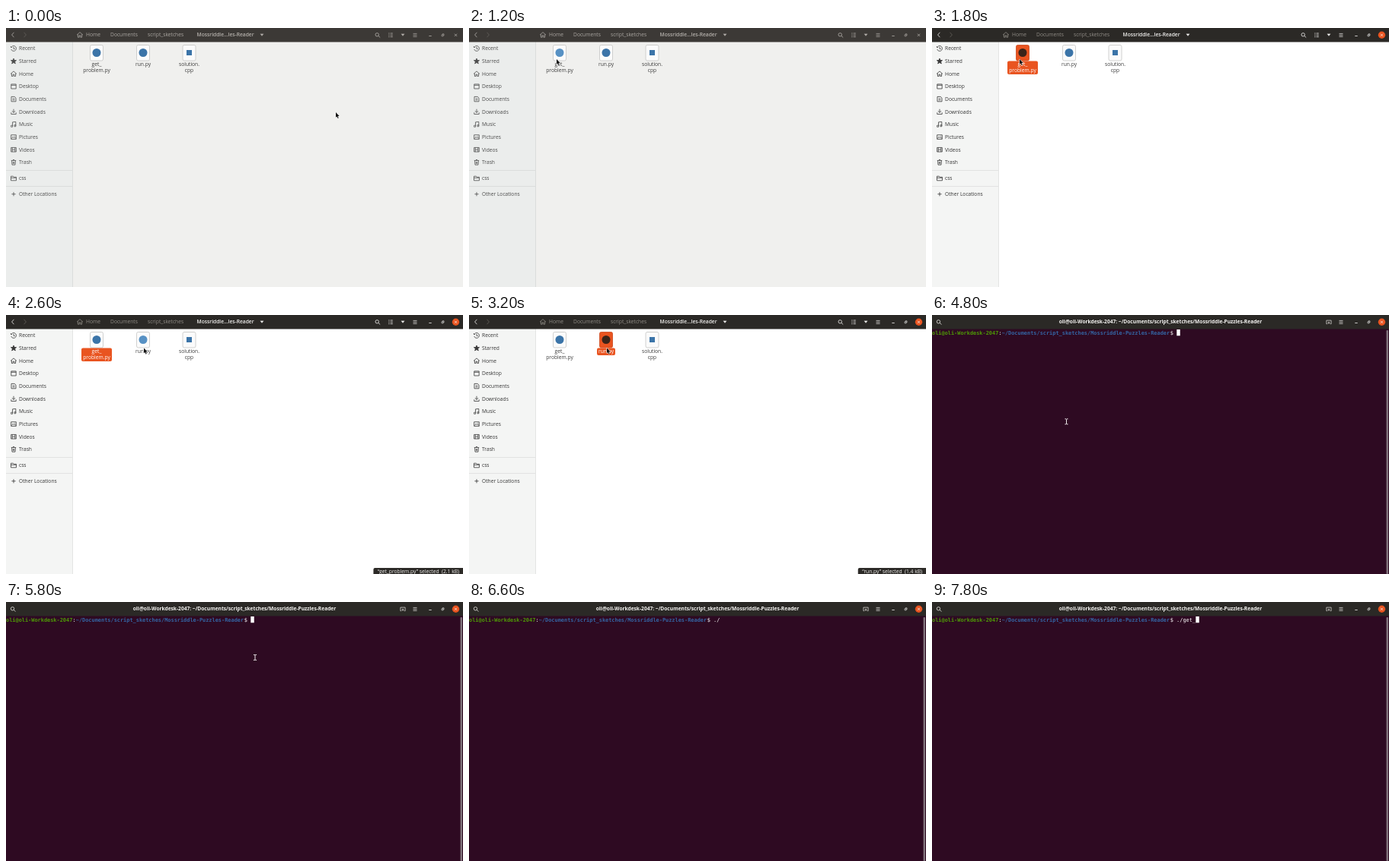
These frames come from a looping animation (600 px wide and 341 px high, 8000 ms). An HTML page with a canvas:

```html
<!DOCTYPE html>
<html lang="en">
<head>
<meta charset="utf-8">
<style>
html, body { margin: 0; width: 100%; height: 100%; overflow: hidden; }
canvas { display: block; }
</style>
</head>
<body>
<canvas id="stage" width="600" height="341"></canvas>
<script>
const ctx = document.getElementById('stage').getContext('2d');
const UI = '"Open Sans", "Noto Sans", sans-serif';
const MONO = '6.92px "DejaVu Sans Mono", monospace';
const CELL = 4.17, ORANGE = '#e95420';
const HOST = 'oli@oli-Workdesk-2047';
const FOLDER = '~/Documents/script_sketches/Mossriddle-Puzzles-Reader';

// Symbolic icons, drawn around their own centre
const ICONS = {
  clock: 'M-2.6-2.2A3.4 3.4 0 1 1-3.2 1M-3.6-3V-1.5H-2M0-2V.4H1.8',
  star: 'M0-3.6L1-1.1 3.6-1 1.6.7 2.3 3.3 0 1.8-2.3 3.3-1.6.7-3.6-1-1-1.1Z',
  home: 'M-4 .2L0-3.4 4 .2M-2.6-.6V3.2H-.8V.8H.8V3.2H2.6V-.6',
  desktop: 'M-3.2-3H3.2V3H-3.2ZM-3.2-1.6H3.2',
  document: 'M-3-3.2H1.2L3-1.4V3.2H-3ZM-1.4-.6H1.4M-1.4 1.2H1.4',
  download: 'M0-3.5V1M-2-1L0 1.2 2-1M-3.2 1V3.2H3.2V1',
  music: 'M-1.4 2.4V-3L2.8-3.4V1.8M-1.5 2.4A1 .8 0 1 1-3.3 2.4 1 .8 0 1 1-1.5 2.4M2.8 1.8A1 .8 0 1 1 1 1.8 1 .8 0 1 1 2.8 1.8',
  picture: 'M-3.3-2.8H3.3V2.8H-3.3ZM-2.6 2L-.8-.4.6 1 1.6 0 2.8 2M1-1.2H1.6',
  video: 'M-3.3-2.8H3.3V2.8H-3.3ZM-1.8-2.8V2.8M1.8-2.8V2.8M-1.8 0H1.8',
  trash: 'M-3.2-2.4H3.2M-1-3.3H1M-2.4-2.2L-2 3.3H2L2.4-2.2M-.7-.8V2M.7-.8V2',
  folder: 'M-3.5-2.8H-.6L.2-1.7H3.5V2.8H-3.5ZM-3.5-.7H3.5',
  plus: 'M-2.6 0H2.6M0-2.6V2.6',
  back: 'M1.4-3.2L-1.4 0 1.4 3.2',
  forward: 'M-1.4-3.2L1.4 0-1.4 3.2',
  search: 'M1.4-.5A2.2 2.2 0 1 1-3-.5 2.2 2.2 0 1 1 1.4-.5M.9 1.1L3.2 3.2',
  list: 'M-2.8-2.3H-1.5M-.4-2.3H2.8M-2.8 0H-1.5M-.4 0H2.8M-2.8 2.3H-1.5M-.4 2.3H2.8',
  menu: 'M-2.5-2H2.5M-2.5 0H2.5M-2.5 2H2.5',
  tab: 'M-1.8 2.4H-3.1V-2.2H3.1V2.4H1.8M0-.7V2.5M-1.5.9H1.5',
  minimise: 'M-1.7 1.3H1.7',
  restore: 'M-1.5-.6H.6V1.4H-1.5ZM-.5-.8V-1.6H1.5V.4H.8',
  close: 'M-1.6-1.6L1.6 1.6M1.6-1.6L-1.6 1.6'
};
const PLACES = [['clock', 'Recent'], ['star', 'Starred'], ['home', 'Home'],
  ['desktop', 'Desktop'], ['document', 'Documents'], ['download', 'Downloads'],
  ['music', 'Music'], ['picture', 'Pictures'], ['video', 'Videos'], ['trash', 'Trash']];

function box(x, y, w, h, color, radius = 0, border) {
  ctx.beginPath();
  ctx.roundRect(x, y, w, h, radius);
  ctx.fillStyle = color;
  ctx.fill();
  if (border) {
    ctx.strokeStyle = border;
    ctx.lineWidth = 0.8;
    ctx.stroke();
  }
}

function disc(x, y, r, color) {
  ctx.beginPath();
  ctx.arc(x, y, r, 0, 7);
  ctx.fillStyle = color;
  ctx.fill();
}

function text(str, x, y, color, { font = '6.7px ' + UI, align = 'left' } = {}) {
  ctx.font = font;
  ctx.textAlign = align;
  ctx.fillStyle = color;
  ctx.fillText(str, x, y + 2.4);
}

function shape(path, x, y, color, { width = 0.8, fill } = {}) {
  ctx.save();
  ctx.translate(x, y);
  const p = new Path2D(path);
  ctx.lineWidth = width;
  ctx.strokeStyle = color;
  ctx.stroke(p);
  if (fill) {
    ctx.fillStyle = fill;
    ctx.fill(p);
  }
  ctx.restore();
}

const icon = (name, x, y, color, width) =>
  shape(ICONS[name], x, y, color, { width, fill: name === 'star' && color });

const arrow = (x, y) => shape('M0 0V6.8L1.5 5.4 2.6 7.9 3.7 7.4 2.6 5H4.7Z', x, y,
  '#ffffff', { width: 1, fill: '#111111' });

const ibeam = (x, y, color) =>
  shape('M-2-3.5H-.5L0-3 .5-3.5H2M0-3V3M-2 3.5H-.5L0 3 .5 3.5H2', x, y, color, { width: 1 });

function windowButtons(color, focused) {
  icon('menu', 537, 9.4, color, 0.7);
  icon('minimise', 557, 9.2, color);
  icon('restore', 573.5, 9.4, color, 0.6);
  if (focused) disc(590.5, 9.3, 4.7, ORANGE);
  icon('close', 590.5, 9.3, color);
}

function file(x, lines, half, { selected, hovered, square }) {
  const tinted = selected && hovered;
  box(x - 8.5, 22.5, 17, 20.5, tinted ? ORANGE : '#fbfbfb', 2, tinted ? '#c9481c' : '#c6c6c4');
  const color = tinted ? '#3a2419' : hovered ? '#5791c4' : '#3b74a8';
  if (square) box(x - 3.5, 29, 7, 7, color);
  else disc(x, 32.5, 5.5, color);
  if (selected) box(x - half, 43.4, half * 2, lines.length * 8 + 1.6, ORANGE, 2);
  lines.forEach((line, i) =>
    text(line, x, 48 + i * 8, selected ? '#ffffff' : '#3d3d3d', { align: 'center' }));
}

function fileManager(t) {
  const focused = t >= 1800;
  const bright = focused ? '#f4f3f1' : '#b5b1ac';
  const dim = focused ? '#918d87' : '#aaa6a1';
  const ink = focused ? '#363636' : '#4c4c4c';
  const rule = focused ? '#dcdddc' : '#d6d8d7';

  box(0, 0, 600, 341, focused ? '#ffffff' : '#f0f0ee');
  box(0, 18, 87, 323, focused ? '#f4f5f4' : '#ebedec');
  box(87, 18, 0.8, 323, rule);
  box(0, 187, 87, 0.8, rule);
  box(0, 208, 87, 0.8, rule);
  box(0, 0, 600, 18.5, focused ? '#2b2926' : '#3c3936');

  icon('back', 9, 9, bright);
  icon('forward', 25, 9, '#65615c');
  icon('home', 97, 9, dim);
  text('Home', 105, 9, dim);
  text('Documents', 137, 9, dim);
  text('script_sketches', 186, 9, dim);
  text('Mossriddle…les-Reader', 250.5, 9, bright, { font: '600 6.7px ' + UI });
  for (const x of [336, 521])
    shape('M-2.2-1.2H2.2L0 1.6Z', x, 9, bright, { width: 0.2, fill: bright });
  icon('search', 488, 9.3, bright);
  icon('list', 505, 9.3, bright);
  windowButtons(bright, focused);

  PLACES.forEach(([name, label], i) => {
    const y = 27 + i * 16.65;
    icon(name, 10, y, ink);
    text(label, 17, y, ink);
  });
  icon('folder', 10, 198, ink);
  text('css', 17, 198, ink);
  icon('plus', 10, 218.7, ink);
  text('Other Locations', 17, 218.7, ink);

  file(119, ['get_', 'problem.py'], 20, {
    selected: t >= 1800 && t < 3000, hovered: t >= 1200 && t < 2400 });
  file(180, ['run.py'], 12, { selected: t >= 3000, hovered: t >= 2600 && t < 3600 });
  file(240.5, ['solution.', 'cpp'], 15, { square: true });

  if (t >= 2000) {
    const note = t < 3200 ? '“get_problem.py” selected  (2.1 kB)' : '“run.py” selected  (1.4 kB)';
    ctx.font = '6.7px ' + UI;
    const width = ctx.measureText(note).width + 10.5;
    box(600 - width, 333, width, 8, '#2c2a27', [2, 0, 0, 0]);
    text(note, 595, 337.8, '#f4f3f1', { align: 'right' });
  }

  if (t >= 4600) ibeam(176.5, 140.3, '#444444');
  else arrow(...pointer(t));
}

function pointer(t) {
  if (t < 1200) {
    const k = Math.max(0, (t - 200) / 1000);
    const s = k * k * (3 - 2 * k);
    return [433 - 318 * s, 111 - 70 * s];
  }
  if (t < 2400) return [115, 41];
  if (t < 2600) return [150, 40];
  if (t < 3600) return [181, 43.5];
  return t < 3800 ? [181, 88] : [176, 140];
}

function terminal(t) {
  box(0, 0, 600, 341, '#2e0a22');
  box(0, 0, 600, 18.5, '#2b2926');
  box(596.5, 20, 2.5, 321, '#81737c', 1);
  icon('search', 9.3, 9.3, '#e8e6e3');
  icon('tab', 521, 9.3, '#e8e6e3', 0.7);
  windowButtons('#f4f3f1', true);
  text(`${HOST}: ${FOLDER}`, 300, 9, '#f4f3f1', { font: 'bold 6.63px ' + UI, align: 'center' });

  let column = 0;
  const write = (str, color, weight = '') => {
    text(str, column * CELL, 23.5, color, { font: weight + MONO });
    column += str.length;
  };
  const typed = [6000, 6200, 6800, 7000, 7200, 7800].filter(key => t >= key).length;
  write(HOST, '#4e9a06', 'bold ');
  write(':', '#ffffff');
  write(FOLDER, '#3465a4', 'bold ');
  write('$ ' + './get_'.slice(0, typed), '#ffffff');

  const blinkedOff = (t >= 5200 && t < 5800) || (t >= 6600 && t < 6800);
  if (!blinkedOff) box(column * CELL + 0.2, 19, CELL + 0.3, 8.3, '#ffffff');

  if (t < 5000) ibeam(176.5, 140.3, '#f0ebee');
  else if (t < 5200) ibeam(260, 104, '#f0ebee');
  else if (t < 6000) ibeam(327, 73, '#f0ebee');
}

function draw() {
  const t = Math.floor(performance.now() % 8000 / 200) * 200;
  (t < 4800 ? fileManager : terminal)(t);
  requestAnimationFrame(draw);
}
draw();
</script>
</body>
</html>
```
